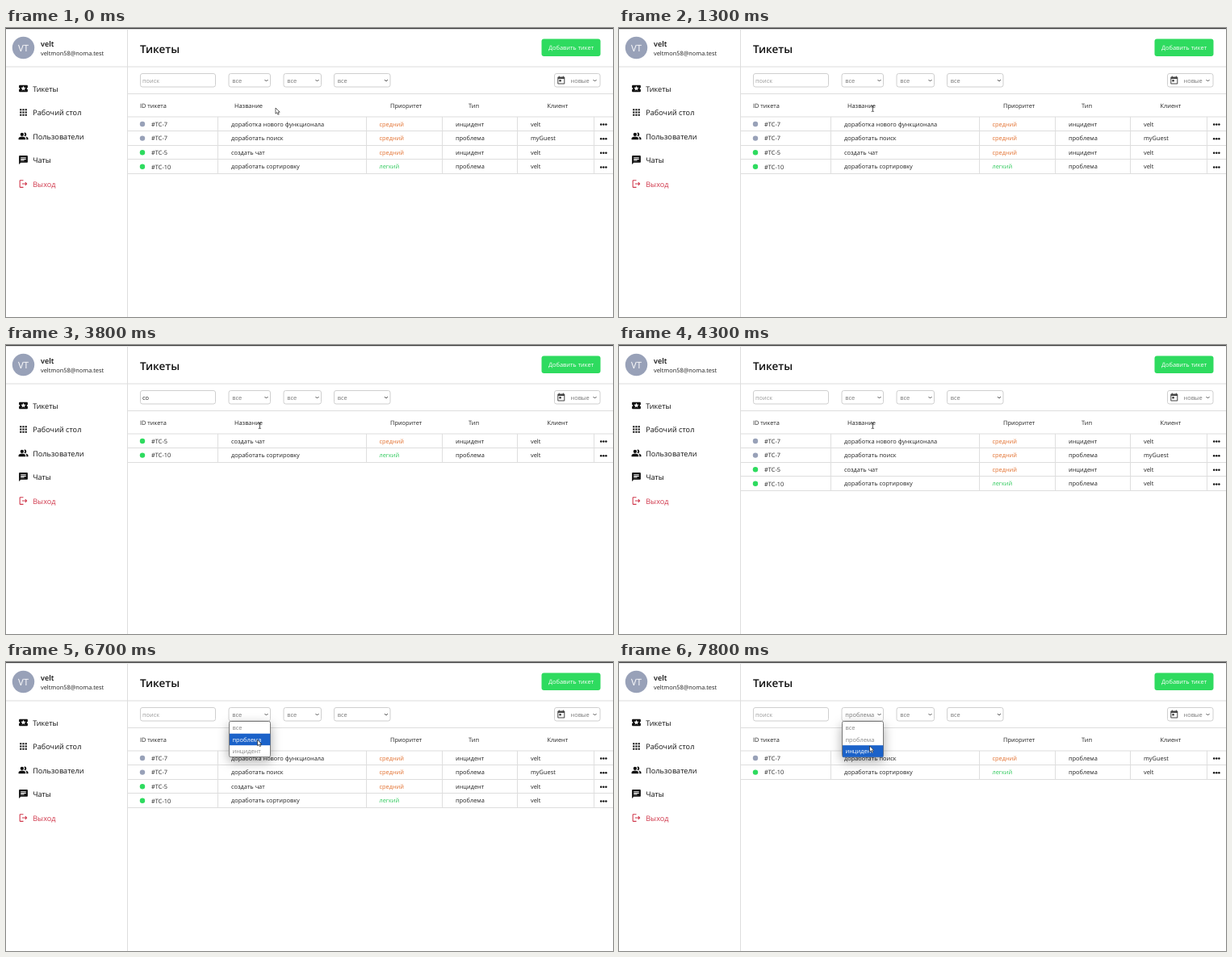
These frames come from a looping animation (752x358 px, 8 s). An HTML page:

```html
<!DOCTYPE html>
<html lang="ru">
<head>
<meta charset="utf-8">
<title>Тикеты</title>
<style>
  html, body { margin: 0; width: 100%; height: 100%; overflow: hidden; background: #fff; }
  svg { display: block; font: 7.4px "Open Sans", "Noto Sans", sans-serif; text-rendering: geometricPrecision; }
</style>
</head>
<body>
<svg id="stage" width="752" height="358" viewBox="0 0 752 358">
  <g id="base"></g>
  <g id="rows"></g>
  <g id="filters"></g>
  <g id="cursor"></g>
</svg>
<script>
const LOOP = 8000;
const GREEN = '#2edb5f', GRAY = '#98a1b8', LINE = '#dedede', INK = '#222', MUTED = '#777', RED = '#d0384c';
const $ = id => document.getElementById(id);

const text = (x, y, s, fill = INK, extra = '') => `<text x="${x}" y="${y}" fill="${fill}" ${extra}>${s}</text>`;
const rect = (x, y, w, h, fill, extra = '') => `<rect x="${x}" y="${y}" width="${w}" height="${h}" fill="${fill}" ${extra}/>`;
const dot = (x, y, r, fill) => `<circle cx="${x}" cy="${y}" r="${r}" fill="${fill}"/>`;
const hline = (x, y) => rect(x, y, 752 - x, 1, LINE);
const icon = (d, x, y, size, fill) =>
  `<path d="${d}" fill="${fill}" transform="translate(${x} ${y}) scale(${size / 24})"/>`;
const box = (x, w) => rect(x, 56.5, w, 16.5, '#fff', 'rx="2.5" stroke="#cfcfcf"');
const chevron = x => `<path d="M${x - 2} 64l2 2 2-2" fill="none" stroke="#555"/>`;
const select = (x, w, label) => box(x, w) + text(x + 4.3, 68.3, label, MUTED) + chevron(x + w - 5);

const MENU = [
  ['Тикеты', 'M20 12c0-1.1.9-2 2-2V6c0-1.1-.9-2-2-2H4c-1.1 0-2 .9-2 2v4c1.1 0 2 .9 2 2s-.9 2-2 2v4c0 1.1.9 2 2 2h16c1.1 0 2-.9 2-2v-4c-1.1 0-2-.9-2-2zm-4.4 4.8L12 14.5l-3.6 2.3 1.1-4.1-3.3-2.7 4.2-.3L12 5.8l1.5 4 4.3.2-3.3 2.7z'],
  ['Рабочий стол', [4, 10, 16].map(y => `M4 ${y}h4v4H4zm6 0h4v4h-4zm6 0h4v4h-4z`).join('')],
  ['Пользователи', 'M16.7 13.1C18 14 19 15.3 19 17v3h4v-3c0-2.2-3.6-3.5-6.3-3.9zM15 12a4 4 0 1 0-1.3-7.8 6 6 0 0 1 0 7.6c.4.1.8.2 1.3.2zM9 12a4 4 0 1 0 0-8 4 4 0 0 0 0 8zm0 1c-2.7 0-8 1.3-8 4v3h16v-3c0-2.7-5.3-4-8-4z'],
  ['Чаты', 'M20 2H4c-1.1 0-2 .9-2 2v18l4-4h14c1.1 0 2-.9 2-2V4c0-1.1-.9-2-2-2zM6 9h12v2H6zm8 5H6v-2h8zm4-6H6V6h12z'],
  ['Выход', 'M17 8l-1.4 1.4 1.6 1.6H9v2h8.2l-1.6 1.6L17 16l4-4zM5 5h7V3H5c-1.1 0-2 .9-2 2v14c0 1.1.9 2 2 2h7v-2H5z'],
];
const CALENDAR = 'M19 3h-1V1h-2v2H8V1H6v2H5c-1.1 0-2 .9-2 2v14c0 1.1.9 2 2 2h14c1.1 0 2-.9 2-2V5c0-1.1-.9-2-2-2zm0 16H5V8h14zM7 10h5v5H7z';
const HEADS = [[166, 'ID тикета'], [283, 'Название'], [476, 'Приоритет'], [573, 'Тип'], [670.5, 'Клиент']];
const TICKETS = [
  ['#TC-7', 'доработка нового функционала', 'средний', 'инцидент', 'velt', GRAY],
  ['#TC-7', 'доработать поиск', 'средний', 'проблема', 'myGuest', GRAY],
  ['#TC-5', 'создать чат', 'средний', 'инцидент', 'velt', GREEN],
  ['#TC-10', 'доработать сортировку', 'легкий', 'проблема', 'velt', GREEN],
];
const TYPES = ['все', 'проблема', 'инцидент'];

$('base').innerHTML = [
  rect(0, 0, 752, 1.2, '#3a3a3a'),
  rect(150, 1, 1, 357, LINE),
  hline(0, 47.5), hline(150, 81), hline(150, 109.5),
  dot(21.5, 24.5, 13.7, GRAY),
  text(21.5, 28.7, 'VT', '#fff', 'font-size="11.4" text-anchor="middle"'),
  text(43, 22.8, 'velt', '#111', 'font-size="9.2" font-weight="600"'),
  text(43, 34.4, 'veltmon58@noma.test'),
  ...MENU.map(([label, path], i) => {
    const y = 75.2 + 29.5 * i, fill = i == 4 ? RED : '#111';
    return icon(path, 15, y - 6.7, 13, fill) + text(33.2, y + 3.6, label, fill, 'font-size="9.15"');
  }),
  text(166, 30.8, 'Тикеты', '#111', 'font-size="13.5" font-weight="600"'),
  rect(663.5, 13.5, 73, 21.5, GREEN, 'rx="3"'),
  text(672, 27, 'Добавить тикет', '#fff'),
  box(679.5, 56.5), icon(CALENDAR, 681.8, 59, 12, '#444'), text(699.5, 68.3, 'новые', MUTED), chevron(729.5),
  ...HEADS.map(([x, s]) => text(x, 99.2, s)),
].join('');

function drawRow([id, name, priority, type, client, status], i) {
  const top = Math.round(110 + 17.6 * i), y = 119 + 17.6 * i, base = y + 2.5;
  return [262, 446, 540, 633, 728].map(x => rect(x, top, 1, 17.6, LINE)).join('')
    + hline(150, Math.round(top + 17.2))
    + dot(169, y, 3.2, status)
    + text(180, base + .3, id) + text(279, base, name)
    + text(462.5, base, priority, priority == 'легкий' ? '#2fc95c' : '#e2702f')
    + text(557, base, type) + text(650, base, client)
    + [737.2, 740.3, 743.4].map(x => dot(x, y + .6, 1.25, '#111')).join('');
}

function drawMenu(active) {
  const items = TYPES.map((label, i) => {
    const y = 74.2 + 14.5 * i, on = i == active;
    return (on ? rect(277, y, 50.3, 14.5, '#1b62c9') : '') + text(280.5, y + 10.2, label, on ? '#fff' : '#868686');
  }).join('');
  return `<g style="filter:drop-shadow(0 5px 7px #0005)">${rect(276.5, 73.5, 51, 44.2, '#fff', 'rx="2" stroke="#777"')}</g>` + items;
}

// Pointer path: time, x, y
const PATH = [
  [0, 334, 99], [450, 218, 65], [600, 218, 65], [1300, 314.3, 100], [5000, 314.3, 100],
  [5800, 309.5, 61], [5950, 309.5, 61], [6500, 311.5, 96.5], [6800, 311.5, 96.5],
  [7150, 311, 64], [7250, 311, 64], [7500, 311, 98], [7700, 311, 98], [7800, 310.5, 104], [LOOP, 310.5, 104],
];
function pointer(t) {
  const i = PATH.findIndex(p => p[0] > t);
  const [t0, x0, y0] = PATH[i - 1], [t1, x1, y1] = PATH[i];
  const k = (t - t0) / (t1 - t0), e = k * k * (3 - 2 * k);
  return [x0 + (x1 - x0) * e, y0 + (y1 - y0) * e];
}
const ARROW = '<path d="M0 0v7.2l1.7-1.5 1.2 2.6 1.3-.6-1.2-2.5h2.2z" fill="#fff" stroke="#222" stroke-width=".7"/>';
const IBEAM = '<path d="M-1.5-3.2h1.1l.4.4.4-.4h1.1M0-2.8v5.8M-1.5 3.4h1.1l.4-.4.4.4h1.1" fill="none" stroke="#222" stroke-width=".8"/>';

const within = (t, ...spans) => spans.some(([a, b]) => t >= a && t < b);

function state(t) {
  const y = pointer(t)[1];
  const open = within(t, [5900, 6800], [7250, LOOP]);
  const type = t < 6800 ? 0 : 1;
  return {
    query: within(t, [2300, 4000]) ? 'со' : '',
    caret: within(t, [500, 1000], [1600, 2050], [2300, 3000], [4000, 4300]),
    type,
    active: !open ? -1 : y < 74 ? type : Math.min(2, Math.floor((y - 74.2) / 14.5)),
  };
}

let shown = '';
function render(s) {
  const key = JSON.stringify(s);
  if (key == shown) return;
  shown = key;
  $('rows').innerHTML = TICKETS
    .filter(r => r[1].includes(s.query) && (!s.type || r[3] == TYPES[s.type]))
    .map(drawRow).join('');
  $('filters').innerHTML = box(166.5, 93)
    + (s.query ? text(169, 68.2, s.query) : text(169, 68.2, 'поиск', '#9a9a9a'))
    + (s.caret ? rect(s.query ? 177.2 : 168.6, 60.5, .8, 9, '#222') : '')
    + select(276, 51.5, TYPES[s.type]) + select(344, 46.5, 'все') + select(406.5, 69.5, 'все')
    + (s.active < 0 ? '' : drawMenu(s.active));
}

function frame() {
  const t = performance.now() % LOOP, [x, y] = pointer(t);
  render(state(t));
  $('cursor').setAttribute('transform', `translate(${x} ${y})`);
  $('cursor').innerHTML = within(t, [330, 720], [1200, 5200]) ? IBEAM : ARROW;
  requestAnimationFrame(frame);
}
frame();
</script>
</body>
</html>
```
